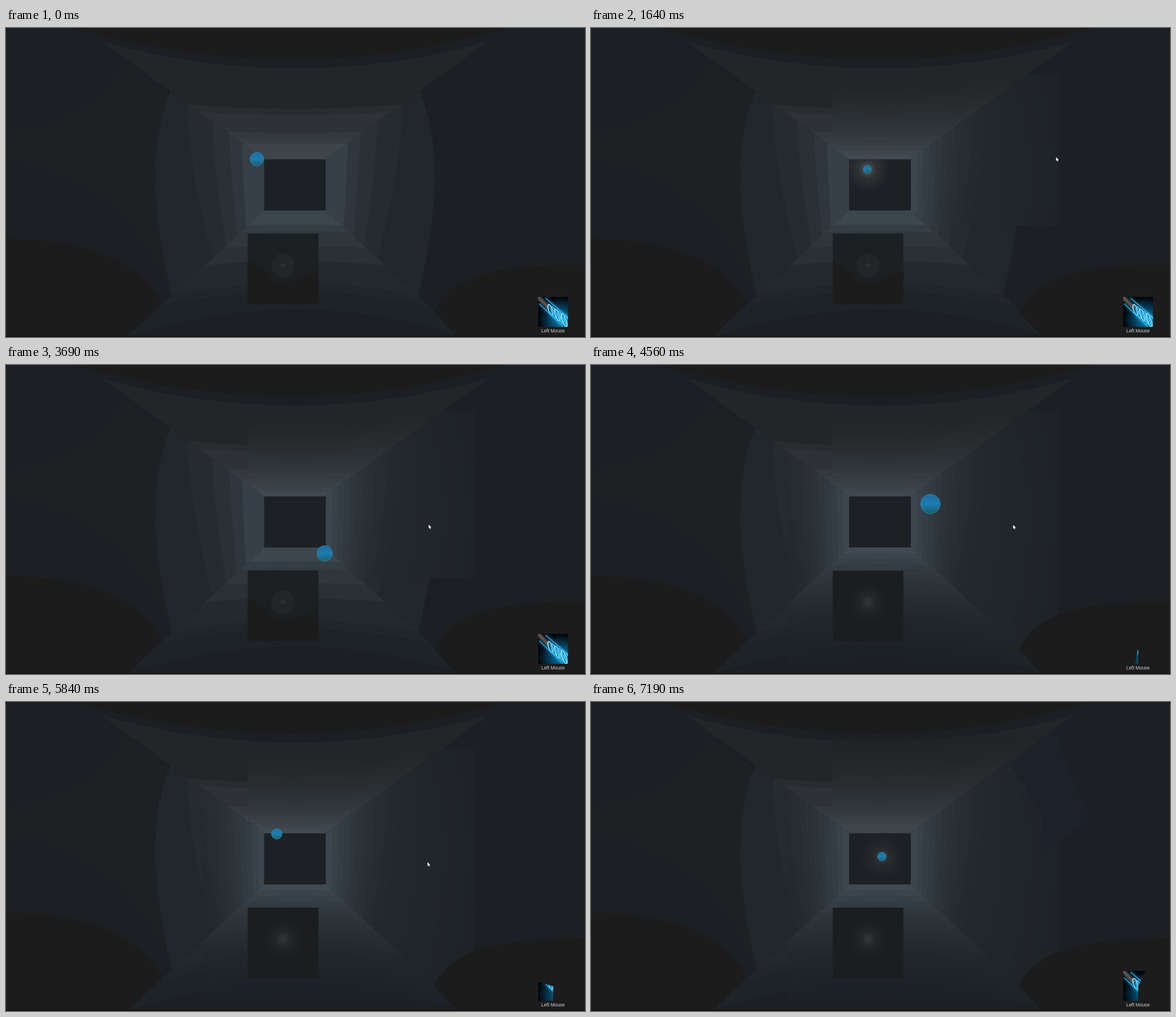
Write an HTML page with a canvas that moves like this. It is 1024 px wide and 547 px high and loops after 7290 ms.

```html
<!DOCTYPE html>
<html lang="en">
<head>
<meta charset="utf-8">
<title>Tunnel ball</title>
<style>
html, body { margin: 0; width: 100%; height: 100%; overflow: hidden; background: #1c2024; }
canvas { display: block; width: 100vw; height: 100vh; }
</style>
</head>
<body>
<canvas id="stage" width="1024" height="547"></canvas>
<script>
const ctx = document.getElementById('stage').getContext('2d');
const LOOP = 7290, STEP = 6990 / 72;
const RELIGHT = 300, HIT = 4430, SETTLE = 6350;
const VX = 511, VY = 272;                              // vanishing point
const HALF = 55, UP = 40, DOWN = 51;                   // back wall, seen from there
const BACK = { x: 456.5, y: 232.5, w: 109, h: 90.5 };

const clamp = (v, lo = 0, hi = 1) => Math.min(hi, Math.max(lo, v));

// Reflects a steadily growing value between two walls.
function bounce(v, lo, hi) {
  const span = hi - lo, u = ((v - lo) % (2 * span) + 2 * span) % (2 * span);
  return lo + (u < span ? u : 2 * span - u);
}

function ballAt(t) {
  const before = t < HIT, s = t - (before ? 1640 : 4560);
  return {
    x: bounce(before ? -21.5 + 0.0234 * s : 35.6 - 0.0857 * s, -48, 48),
    y: bounce(before ? -21.5 + 0.1009 * s : -10.4 - 0.0218 * s, -33, 44),
    depth: bounce(before ? 0.957 + 0.00025 * s : 0.4 + 0.000263 * s, 0, 0.985)
  };
}

// Edge of a surface at scale k: start corner, curve control, end corner.
const across = (h, sag) => k => [-HALF * k, h * k, 0, h * k * (1 - sag * k * k), HALF * k, h * k];
const upright = w => k => {
  const outer = clamp((k - 3.45) / 0.55);
  const end = k * (Math.max(0.77, 1.1 - 0.1 * k) + 0.22 * outer);
  return [w * k, -UP * k, w * k * (1 + 0.25 * outer), -35, w * end, DOWN * end];
};
const wallLight = { base: [29, 33, 37], gain: [33, 40, 44], fall: 0.7, levels: [4, 3.45, 2.65, 2.1, 1.69] };
const surfaces = {
  top: { edge: across(-UP, 0.01), base: [31, 33, 34], gain: [36, 43, 50], fall: 0.55,
    levels: [6.2, 3.42, 3.1, 2.2, 1.9, 1.68] },
  bottom: { edge: across(DOWN, 0.012), base: [26, 31, 36], gain: [40, 45, 48], fall: 0.62,
    levels: [5.36, 4.3, 3.9, 2.9, 2.3, 1.76, 1.5] },
  left: { edge: upright(-HALF), ...wallLight },
  right: { edge: upright(HALF), ...wallLight }
};
const fine = Array.from({ length: 28 }, (_, i) => 6.4 - i * 0.2);

// Light fades with distance from the back wall; levels set how coarse the bands are.
function light({ edge, base, gain, fall }, levels) {
  levels.forEach((k, i) => {
    const middle = (k + (levels[i + 1] || 1)) / 2;
    const [x0, y0, cx, cy, x1, y1] = edge(k);
    const glow = Math.exp(-(middle - 1) * fall);
    ctx.fillStyle = `rgb(${base.map((b, c) => Math.round(b + gain[c] * glow))})`;
    ctx.beginPath();
    ctx.moveTo(VX, VY);
    ctx.lineTo(VX + x0, VY + y0);
    ctx.quadraticCurveTo(VX + cx, VY + cy, VX + x1, VY + y1);
    ctx.fill();
  });
}

function clipped(x, y, w, h, paint) {
  ctx.save();
  ctx.beginPath();
  ctx.rect(x, y, w, h);
  ctx.clip();
  paint();
  ctx.restore();
}
const relight = (name, x, y, w, h) => clipped(x, y, w, h, () => light(surfaces[name], fine));

function rect(color, x, y, w, h) {
  ctx.fillStyle = color;
  ctx.fillRect(x, y, w, h);
}
function disc(color, x, y, r) {
  ctx.fillStyle = color;
  ctx.beginPath();
  ctx.arc(x, y, r, 0, 7);
  ctx.fill();
}
function shape(color, path) {
  ctx.fillStyle = color;
  ctx.fill(new Path2D(path));
}
function shade(gradient, colors) {
  colors.forEach((c, i) => gradient.addColorStop(i / (colors.length - 1), c));
  return gradient;
}
const linear = (y0, y1, ...colors) => shade(ctx.createLinearGradient(0, y0, 0, y1), colors);
const radial = (x, y, r, ...colors) => shade(ctx.createRadialGradient(x, y, 0, x, y, r), colors);

function drawRoom(t) {
  rect('#1c2024', 0, 0, 1024, 547);
  shape('#1d2124', 'M0 186Q150 170 208 62L290 118V470Q210 260 0 235');
  shape('#1c1c1d', 'M120 0Q510 112 885 0');
  Object.values(surfaces).forEach(s => light(s, s.levels));

  if (t >= RELIGHT) {
    const top = t >= SETTLE ? 60 : 82;
    const low = t >= HIT ? 547 : t >= 3400 ? 378 : 350;
    relight('top', 427, top, 420, 160);
    relight('right', 566, top, 262, low - top);
    if (t >= SETTLE) shape('#1c212a', 'M815 52L883 205L795 275L800 200L745 115');
  }
  if (t >= HIT) {
    relight('left', 347, 140, 110, 290);
    relight('bottom', 350, 323, 450, 207);
  }
  shape('#1c1c1d', 'M0 373C110 374 230 395 275 487L216 547H0');
  shape('#1c1c1d', 'M757 502C790 430 890 420 1024 418V547H797');
  rect('#111314', 0, 545, 1024, 2);
  rect('#1d2024', BACK.x, BACK.y, BACK.w, BACK.h);
}

function drawBox(t) {
  clipped(427.5, 364, 125, 125, () => {
    if (t < HIT) {
      rect('#1c2023', 427, 364, 126, 125);
      shape('#1c1c1d', 'M427 411C460 425 475 468 553 430V490H427');
      disc('#1d2022', 490, 420, 32);
      disc('#222627', 490, 420, 21);
      disc('#2b2f30', 490, 420, 4);
    } else {
      rect('#1c1d1e', 427, 364, 126, 125);
      disc(radial(490, 420, 38, '#34383a', '#242729', '#1e2021', '#1c1d1e'), 490, 420, 38);
    }
  });
}

function drawBall(t) {
  const ball = ballAt(t), r = 7 / ball.depth;
  const x = VX + ball.x / ball.depth, y = VY + ball.y / ball.depth;
  ctx.globalAlpha = clamp((ball.depth - 0.8) / 0.16);
  clipped(BACK.x, BACK.y, BACK.w, BACK.h, () =>
    disc(radial(x, y, 45, '#5c5e5e', '#303335', '#25282b', '#1d202400'), x, y, 45));
  ctx.globalAlpha = 1;
  disc(linear(y - r, y + r, '#1a6da5', '#1e7cae', '#175f70'), x, y, r);
  ctx.strokeStyle = '#3d8794';
  ctx.lineWidth = 0.8;
  ctx.beginPath();
  ctx.arc(x, y, r - 0.4, 0, 7);
  ctx.stroke();
}

function paintIcon() {
  rect(radial(982, 517, 40, '#0f84b8', '#07405f', '#02070c'), 941, 476, 53, 53);
  for (let i = 0; i < 14; i++) disc('#2793bd', 943 + i * 19 % 49, 482 + i * 31 % 46, 0.5);
  ctx.save();
  ctx.translate(941, 476);
  ctx.rotate(0.8);
  rect(linear(-5, 5, '#1b1b1e', '#665c58', '#211d1d'), 0, -5, 29, 10);
  ctx.restore();
  ctx.shadowColor = '#15b7ff';
  ctx.shadowBlur = 4;
  ctx.lineWidth = 1.4;
  for (let i = 0; i < 6; i++) {
    ctx.strokeStyle = i % 2 ? '#62d5ff' : '#c5f3ff';
    ctx.beginPath();
    ctx.ellipse(963 + i * 6, 499 + i * 4.5, 3.5, 10 + i * 0.6, -0.35, 0, 7);
    ctx.stroke();
  }
  ctx.strokeStyle = '#29b3ee';
  ctx.stroke(new Path2D('M954 478L994 512M943 488L985 529'));
}

function drawIcon(t) {
  const cx = 967.5, cy = 503;
  clipped(941, 476, 53, 53, () => {
    if (t >= HIT) {
      const sweep = (t - HIT) * 0.0745 + 2;
      ctx.beginPath();
      ctx.moveTo(cx, cy);
      ctx.arc(cx, cy, 60, Math.PI / 2, (90 + sweep) * Math.PI / 180);
      ctx.clip();
    }
    paintIcon();
  });
  ctx.fillStyle = '#cfd0d1';
  ctx.font = '8.4px "Liberation Sans", Arial, sans-serif';
  ctx.textAlign = 'center';
  ctx.fillText('Left Mouse', cx, 539);
}

function drawCursor(t) {
  if (t < 1250 || t >= SETTLE) return;
  const slide = clamp((t - 3390) / 250), drift = clamp((t - 3690) / 900, 0, 2);
  ctx.save();
  ctx.translate(822.5 - 75 * slide - drift, 228.5 + 54 * slide + drift / 2);
  const arrow = new Path2D('M0 0V7L1.6 5.6L2.8 8L4 7.4L2.9 5.1H5Z');
  ctx.strokeStyle = '#101010';
  ctx.lineWidth = 1;
  ctx.stroke(arrow);
  ctx.fillStyle = '#fff';
  ctx.fill(arrow);
  ctx.restore();
}

// The picture advances in steps of about 97 ms after a longer first one.
const snap = t => t < 200 ? 100 : 200 + (Math.floor((t - 200) / STEP + 0.25) - 0.1) * STEP;

function draw() {
  const t = snap(performance.now() % LOOP);
  drawRoom(t);
  drawBox(t);
  drawBall(t);
  drawIcon(t);
  drawCursor(t);
  requestAnimationFrame(draw);
}
draw();
</script>
</body>
</html>
```
